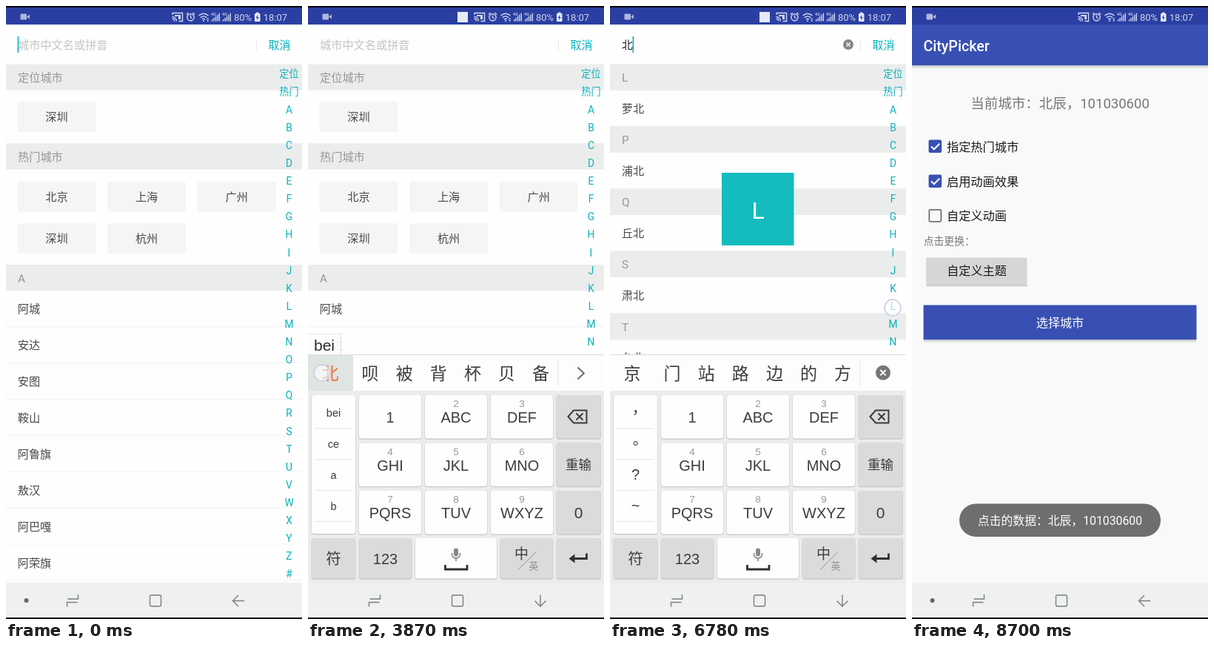
Animation, 400 px wide and 827 px high, one loop 8.73 s. Source, as an HTML page with a canvas:

```html
<!DOCTYPE html>
<html lang="zh-CN">
<head>
<meta charset="utf-8">
<title>CityPicker</title>
<style>
html, body { margin: 0; width: 100%; height: 100%; overflow: hidden; background: #000; }
canvas { display: block; width: 400px; height: 827px; }
</style>
</head>
<body>
<canvas id="stage"></canvas>
<script>
const LOOP = 8730;
const TEAL = '#08b3bd', BLUE = '#3850b4', PAPER = '#fdfefd', BAND = '#ebecec', NAV = '#eff0f0', ICON = '#737675';
const UI = 'Roboto, "Noto Sans CJK SC", sans-serif';
const CENTERED = 'Roboto, "Noto Sans CJK TC", "Noto Sans CJK SC", sans-serif';
const KEYS = '"Liberation Sans", Arial, "Noto Sans CJK SC", sans-serif';

const canvas = document.getElementById('stage');
const dpr = window.devicePixelRatio || 1;
canvas.width = 400 * dpr;
canvas.height = 827 * dpr;
const c = canvas.getContext('2d');

// ---- helpers ----
function rect(x, y, w, h, color) {
  c.fillStyle = color;
  c.fillRect(x, y, w, h);
}
function round(x, y, w, h, r, color) {
  c.beginPath();
  c.moveTo(x + r, y);
  c.arcTo(x + w, y, x + w, y + h, r);
  c.arcTo(x + w, y + h, x, y + h, r);
  c.arcTo(x, y + h, x, y, r);
  c.arcTo(x, y, x + w, y, r);
  c.closePath();
  if (color) { c.fillStyle = color; c.fill(); }
}
function disc(x, y, r, color) {
  c.beginPath();
  c.arc(x, y, r, 0, 7);
  c.fillStyle = color;
  c.fill();
}
function path(d, color, width = 1.5) {
  c.strokeStyle = color;
  c.lineWidth = width;
  c.stroke(new Path2D(d));
}
function shape(d, color) {
  c.fillStyle = color;
  c.fill(new Path2D(d));
}
// y is the optical middle of the line
function text(s, x, y, size, color, align = 'left', font = UI, weight = 400) {
  c.font = `${weight} ${size}px ${font}`;
  c.textAlign = align;
  c.fillStyle = color;
  c.fillText(s, x, y + size * .365);
}
function mid(s, x, y, size, color, font) { text(s, x, y, size, color, 'center', font); }
function ramp(t, a, b) { return Math.min(1, Math.max(0, (t - a) / (b - a))); }
function easeOut(p) { return 1 - (1 - p) ** 3; }
function track(t, points) {
  for (let i = 1; i < points.length; i++) {
    const [t0, v0] = points[i - 1], [t1, v1] = points[i];
    if (t <= t1) return v0 + (v1 - v0) * ramp(t, t0, t1);
  }
  return points[points.length - 1][1];
}
function clipped(x, y, w, h, draw) {
  c.save();
  c.beginPath();
  c.rect(x, y, w, h);
  c.clip();
  draw();
  c.restore();
}

// ---- timing ----
const COMMIT = 4080, INDEX_ON = 6330, INDEX_OFF = 7290;
const taps = [
  { x: 199, y: 557, from: 2640, to: 2760, key: '2' },
  { x: 289, y: 557, from: 2950, to: 3070, key: '3' },
  { x: 111, y: 620, from: 3250, to: 3370, key: '4' },
  { x: 19, y: 495, from: 3780, to: 4020 },
  { x: 294, y: 185, from: 7590, to: 7970 }
];
const stages = [
  { at: 2760, pinyin: 'a', side: ['a', 'b', 'c', '2'], words: '啊不吧次才从阿' },
  { at: 3070, pinyin: 'ce', side: ['ce', 'be', 'ad', 'a'], words: '测策侧册厕阿德' },
  { at: 3370, pinyin: 'bei', side: ['bei', 'ce', 'a', 'b'], words: '北呗被背杯贝备' }
];
const indexY = t => track(t, [[INDEX_ON, 166], [6700, 407], [6860, 407], [7180, 166]]);
const dragScroll = t => track(t, [[4950, 0], [5340, 135], [5520, 230]]);

// ---- city lists ----
const HEAD = 35.3, ROW = 48.88, TOP = 78.3;
const INDEX = ['定位', '热门', ...'ABCDEFGHIJKLMNOPQRSTUVWXYZ#'];
const found = [
  ['B', '北京 北辰 北碚 北安 北镇 北票 北戴河 北仑 北川 北流 北海'],
  ['H', '海北 淮北'], ['J', '江北'], ['L', '萝北'], ['P', '浦北'], ['Q', '丘北'],
  ['S', '肃北'], ['T', '台北'], ['X', '新北'], ['Y', '渝北']
].map(([name, list]) => ({ name, rows: list.split(' ') }));
let offset = 0;
for (const s of found) {
  s.top = offset;
  offset += HEAD + s.rows.length * ROW;
}
const nearIndex = t => INDEX[Math.round((indexY(t) - 91) / 24.1)];

function scrollAt(t) {
  if (t >= INDEX_OFF) return 0;
  if (t >= INDEX_ON) {
    const letter = nearIndex(t);
    const hit = found.filter(s => s.name <= letter).pop();
    return hit ? hit.top : 0;
  }
  return dragScroll(t) + 170 * easeOut(ramp(t, 5520, 6000));
}

function band(name, y) {
  rect(0, y, 400, HEAD, BAND);
  text(name, 16, y + 18, 15.2, '#949796');
}
function row(name, y) {
  text(name, 15.7, y + 24.6, 15.2, '#484a49');
  rect(0, y + ROW - 1, 400, 1, '#f1f3f2');
}
function chip(name, col, y) {
  round(15.5 + col * 121.6, y, 106, 41, 4, '#f4f5f5');
  mid(name, 68.5 + col * 121.6, y + 20.6, 15.2, '#484a49');
}
function drawAll() {
  band('定位城市', TOP);
  chip('深圳', 0, 129);
  band('热门城市', 185.3);
  ['北京', '上海', '广州', '深圳', '杭州'].forEach((n, i) => chip(n, i % 3, i < 3 ? 236.5 : 293));
  band('A', 349);
  '阿城 安达 安图 鞍山 阿鲁旗 敖汉 阿巴嘎 阿荣旗 安吉'.split(' ')
    .forEach((n, i) => row(n, 349 + HEAD + i * ROW));
}
function drawFound(scroll) {
  let current = found[0];
  let push = 0;
  for (const s of found) {
    const y = TOP + s.top - scroll;
    band(s.name, y);
    s.rows.forEach((n, i) => row(n, y + HEAD + i * ROW));
    if (s.top <= scroll + .01) current = s;
    else if (s.top < scroll + HEAD) push = s.top - scroll - HEAD;
  }
  band(current.name, TOP + push);
}

function drawPicker(t) {
  const typed = t >= COMMIT;
  rect(0, 25, 400, 802, PAPER);
  clipped(0, TOP, 400, 778 - TOP, () => typed ? drawFound(scrollAt(t)) : drawAll());
  rect(0, 25, 400, TOP - 25, PAPER);
  if (typed) {
    text('北', 15.7, 52, 15.2, '#222');
    disc(322, 52, 7, '#858786');
    path('M319.4 49.4l5.2 5.2M324.6 49.4l-5.2 5.2', '#fff', 1.4);
  } else {
    text('城市中文名或拼音', 16, 52.5, 15.2, '#c2c4c3');
  }
  const blink = typed ? t < 5000 || t % 1000 >= 500 : t % 1000 < 500;
  if (blink) rect(typed ? 30.5 : 15.6, 41, 1.6, 22, TEAL);
  rect(338, 44, 1, 16, '#e9ebea');
  text('取消', 354.5, 52.5, 15, TEAL);
  INDEX.forEach((n, i) => mid(n, 382.5, 91.5 + i * 24.1, i < 2 ? 13.2 : 13.8, TEAL));
  if (t >= INDEX_ON && t < INDEX_OFF) {
    rect(151, 225, 97.5, 98, '#14bcbe');
    mid(nearIndex(t), 200, 275.5, 32, '#fff');
  }
}

// ---- keyboard ----
const digits = ['1', '2', '3', '4', '5', '6', '7', '8', '9'];
const letters = ['', 'ABC', 'DEF', 'GHI', 'JKL', 'MNO', 'PQRS', 'TUV', 'WXYZ'];

function keyBox(x, y, w, h, color) {
  round(x - .5, y, w + 1, h + 1.3, 4, '#c4c8c6');
  round(x, y, w, h, 3.5, color);
}
function toolIcons() {
  rect(23, 483, 22, 22, ICON);
  disc(101, 494.5, 10.5, ICON);
  path('M95 491.5l3.5 1.5l-3.5 1.5M107 491.5l-3.5 1.5l3.5 1.5', '#fff', 1.5);
  shape('M95.5 497h11a5.5 5.5 0 0 1 -11 0z', '#fff');
  round(157, 486, 23, 18, 2, ICON);
  for (let i = 0; i < 10; i++) rect(160 + (i % 5) * 3.7, 489 + (i > 4) * 4, 2, 2, '#fff');
  rect(163, 498, 11, 2.5, '#fff');
  path('M236 487v16M232.5 486h2.2l1.3 1.2l1.3 -1.2h2.2M232.5 504h2.2l1.3 -1.2l1.3 1.2h2.2', ICON, 1.8);
  shape('M225 494.5l5.5 -4v8zM247 494.5l-5.5 -4v8z', ICON);
  c.beginPath();
  c.arc(301, 492, 6.6, 0, 7);
  c.strokeStyle = ICON;
  c.lineWidth = 2;
  c.stroke();
  path('M305.8 496.8l7 7', ICON, 2.4);
  shape('M360.5 490.5h17l-8.5 9z', ICON);
}
function wordBar(t, stage) {
  const words = stage ? stage.words : '京门站路边的方';
  if (stage && t >= taps[3].from) rect(0, 471, 61, 48, '#dfe5e1');
  [...words].forEach((w, i) => mid(w, i ? 38 + i * 46.1 : 30, 495.5, 23, stage && !i ? '#f26a35' : '#3b3d3c', KEYS));
  if (stage) {
    path('M364.5 487.5l8.5 8l-8.5 8', '#626564', 1.8);
  } else {
    disc(369, 494.7, 10, ICON);
    path('M365.3 491l7.4 7.4M372.7 491l-7.4 7.4', '#fff', 2);
  }
}
function drawKeyboard(t) {
  const stage = t < COMMIT ? stages.filter(s => t >= s.at).pop() : null;
  const pressed = taps.find(p => p.key && t >= p.from && t < p.to);
  if (stage) {
    const w = stage.pinyin.length * 9 + 17;
    rect(0, 442, w, 28, 'rgba(252,253,252,.95)');
    rect(w, 442, 1, 28, '#e0e2e1');
    rect(0, 442, w, 1, '#e6e8e7');
    text(stage.pinyin, 8, 457.5, 21, '#2c2e2d', 'left', KEYS);
  }
  rect(0, 470, 400, 49, '#fcfdfc');
  rect(0, 470, 400, 1, '#dcdedd');
  if (stage || t >= COMMIT) wordBar(t, stage);
  else toolIcons();
  rect(337.5, 476, 1, 37, '#dfeadf');
  rect(0, 519, 400, 259, '#ebedec');

  keyBox(5, 525, 59, 187, '#fdfefd');
  for (let i = 0; i < 4; i++) {
    rect(9, 569.5 + i * 41.8, 51, 1, '#e4e6e5');
    if (stage) mid(stage.side[i], 34.5, 549 + i * 41.8, 14.5, '#3b3d3c', KEYS);
    else mid('，。?~'[i], 34.5, 548.5 + i * 41.8, 20, '#3b3d3c', i < 2 ? CENTERED : KEYS);
  }
  digits.forEach((d, i) => {
    const x = 69 + (i % 3) * 89, y = 525 + Math.floor(i / 3) * 64.5;
    keyBox(x, y, 84, 58.5, pressed && pressed.key === d ? '#d3d7d5' : '#fdfefd');
    if (i) mid(d, x + 42, y + 11.5, 13.5, '#969998', KEYS);
    mid(letters[i] || d, x + 42, y + 29.7, 20, '#3b3d3c', KEYS);
  });
  const gray = '#dadcdb';
  for (let i = 0; i < 3; i++) keyBox(336, 525 + i * 64.5, 59.5, 58.5, gray);
  path('M351.5 554l7.5 -8.5h17.5v17h-17.5zM362.5 549.5l9 9M371.5 549.5l-9 9', '#3b3d3c', 2);
  mid('重输', 365.5, 619, 17.5, '#3b3d3c', KEYS);
  mid('0', 365.5, 683.5, 21, '#3b3d3c', KEYS);

  keyBox(5, 718, 59, 54.5, gray);
  keyBox(69, 718, 71, 54.5, gray);
  keyBox(145, 718, 110, 54.5, '#fdfefd');
  keyBox(260, 718, 71, 54.5, gray);
  keyBox(336, 718, 59.5, 54.5, gray);
  mid('符', 34.5, 745.5, 20.5, '#3b3d3c', KEYS);
  mid('123', 104.5, 745.5, 20, '#3b3d3c', KEYS);
  round(197, 731.5, 6, 11, 3, '#868988');
  path('M194.5 738v1.5a5.5 5.5 0 0 0 11 0v-1.5M200 745v4', '#868988', 1.6);
  path('M185.5 754v6h29.5v-6', '#303231', 2.8);
  mid('中', 288.5, 739, 19, '#3b3d3c', KEYS);
  path('M284 760.5L308 736.5', '#8e9190', 1);
  mid('英', 305, 755.5, 13, '#8e9190', KEYS);
  path('M376.5 738.5v7h-18', '#303231', 2.8);
  shape('M352.5 745.5l8 -6v12z', '#303231');
}

// ---- system bars ----
function drawStatus(t) {
  const ink = '#cfd6ee';
  rect(0, 0, 400, 25, '#2b3fa2');
  rect(0, 0, 400, 2, '#05060c');
  round(19.5, 10.5, 8.5, 8, 1, '#aeb8de');
  shape('M28 14.5l4 -3v6z', '#aeb8de');
  if (t >= 960 && t < 7720) rect(202, 8, 14, 14, '#e6eaf6');
  path('M225 12v-2.5h13.5v11h-5M224.5 14.5a6 6 0 0 1 6 6M224.5 17.3a3.2 3.2 0 0 1 3.2 3.2', ink, 1.4);
  rect(228, 12, 8, 2, ink);
  rect(233, 14, 3, 4, ink);
  c.beginPath();
  c.arc(249.5, 15.3, 4.6, 0, 7);
  c.strokeStyle = ink;
  c.lineWidth = 1.5;
  c.stroke();
  path('M249.5 12.5v3l2 1.4M243.8 11.5l3 -2.5M255.2 11.5l-3 -2.5', ink, 1.4);
  path('M260.5 13q6.5 -5.5 13 0M262.8 15.6q4.2 -3.4 8.4 0M265 18q2 -1.5 4 0', ink, 1.4);
  disc(267, 20, 1.1, ink);
  shape('M271 18l1.7 -2l1.7 2zM271 19l1.7 2l1.7 -2z', ink);
  for (const x of [277, 292]) {
    text('4G', x, 11.3, 5.5, ink, 'left', UI, 500);
    for (let i = 0; i < 5; i++) {
      const h = 2.5 + i * 2.1;
      rect(x + 1 + i * 2.4, 20.5 - h, 1.4, h, ink);
    }
  }
  text('80%', 308, 15.3, 13, ink);
  round(336, 10, 7.5, 11, 1, '#e6eaf6');
  rect(338, 8.6, 3.5, 2, '#e6eaf6');
  shape('M340.6 11.5l-3 4.4h2l-.8 3.6l3 -4.6h-2z', '#2b3fa2');
  text('18:07', 347.8, 15.3, 13, ink);
}
function drawNav(keyboardUp) {
  const ink = '#7b7e7d';
  if (!keyboardUp) disc(27.5, 802, 3, '#666');
  path('M97.5 794v6h-14M82.5 810.5v-6h14', ink, 1.4);
  round(194.5, 794.8, 15, 15, 2);
  c.strokeStyle = ink;
  c.lineWidth = 1.4;
  c.stroke();
  path(keyboardUp ? 'M314 794.5v15M306.5 802.5l7.5 7.5l7.5 -7.5' : 'M322 802.5h-15M314 795l-7.5 7.5l7.5 7.5', ink, 1.4);
  rect(0, 825, 400, 2, '#050505');
}

// ---- start page ----
function shadow(x, y, w, h) {
  for (let i = 0; i < h; i++) rect(x, y + i, w, 1, `rgba(0,0,0,${.2 * (1 - i / h)})`);
}
function checkbox(y, on, label) {
  if (on) {
    round(22.5, y - 8.5, 17.5, 17.5, 2, BLUE);
    path(`M26 ${y + .5}l3.8 3.8l7.4 -7.6`, '#fff', 2);
  } else {
    round(23.3, y - 7.7, 16, 16, 1.5);
    c.strokeStyle = '#6f7271';
    c.lineWidth = 1.8;
    c.stroke();
  }
  text(label, 47, y + .8, 16.2, '#1a1c1b');
}
function drawHome(t) {
  rect(0, 25, 400, 753, '#f8faf9');
  rect(0, 778, 400, 49, NAV);
  rect(0, 25, 400, 55, BLUE);
  shadow(0, 80, 400, 4);
  text('CityPicker', 15.5, 54, 19.6, '#fff', 'left', UI, 500);
  mid('当前城市：北辰，101030600', 200, 131, 18.5, '#757877', CENTERED);
  checkbox(189, true, '指定热门城市');
  checkbox(236, true, '启用动画效果');
  checkbox(282.5, false, '自定义动画');
  text('点击更换：', 15.7, 316.5, 13.8, '#757877', 'left', CENTERED);
  shadow(19, 376, 137, 3);
  round(19, 339.5, 136.5, 36.5, 2, '#d5d7d6');
  mid('自定义主题', 87.5, 357.5, 16.1, '#1a1c1b');
  shadow(16, 450, 368, 4);
  rect(15.5, 403.5, 369, 46.5, BLUE);
  mid('选择城市', 200, 427.5, 16.1, '#fff');
  const alpha = ramp(t, 8220, 8460);
  if (alpha > 0) {
    c.globalAlpha = alpha;
    round(64, 671.5, 272, 44.5, 22, '#6c6f6e');
    mid('点击的数据：北辰，101030600', 200, 694.5, 15.8, '#fff', CENTERED);
    c.globalAlpha = 1;
  }
}

function ring(x, y) {
  c.beginPath();
  c.arc(x, y, 11, 0, 7);
  c.fillStyle = 'rgba(255,255,255,.6)';
  c.fill();
  c.strokeStyle = '#cccdea';
  c.lineWidth = 1.5;
  c.stroke();
}
function drawTouch(t) {
  for (const p of taps) if (t >= p.from && t < p.to) ring(p.x, p.y);
  if (t >= 4890 && t < 5540) ring(331, 375 - dragScroll(t));
  if (t >= INDEX_ON && t < INDEX_OFF) ring(382, indexY(t));
}

function draw(t) {
  c.setTransform(dpr, 0, 0, dpr, 0, 0);
  const slide = 780 * ramp(t, 7870, 8180) ** 2;
  const up = easeOut(ramp(t, 450, 720)) - ramp(t, 7640, 7840) ** 2;
  if (slide > 0) drawHome(t);
  if (slide < 780) {
    clipped(0, 25, 400, 802, () => {
      c.translate(0, slide);
      drawPicker(t);
      rect(0, 778, 400, 49, NAV);
    });
  }
  if (up > 0) {
    clipped(0, 25, 400, 753, () => {
      c.translate(0, (1 - up) * 308);
      drawKeyboard(t);
    });
  }
  drawStatus(t);
  drawNav(t >= 480 && t < 7740);
  drawTouch(t);
}

const start = performance.now();
function tick() {
  draw((performance.now() - start) % LOOP);
  requestAnimationFrame(tick);
}
tick();
</script>
</body>
</html>
```
